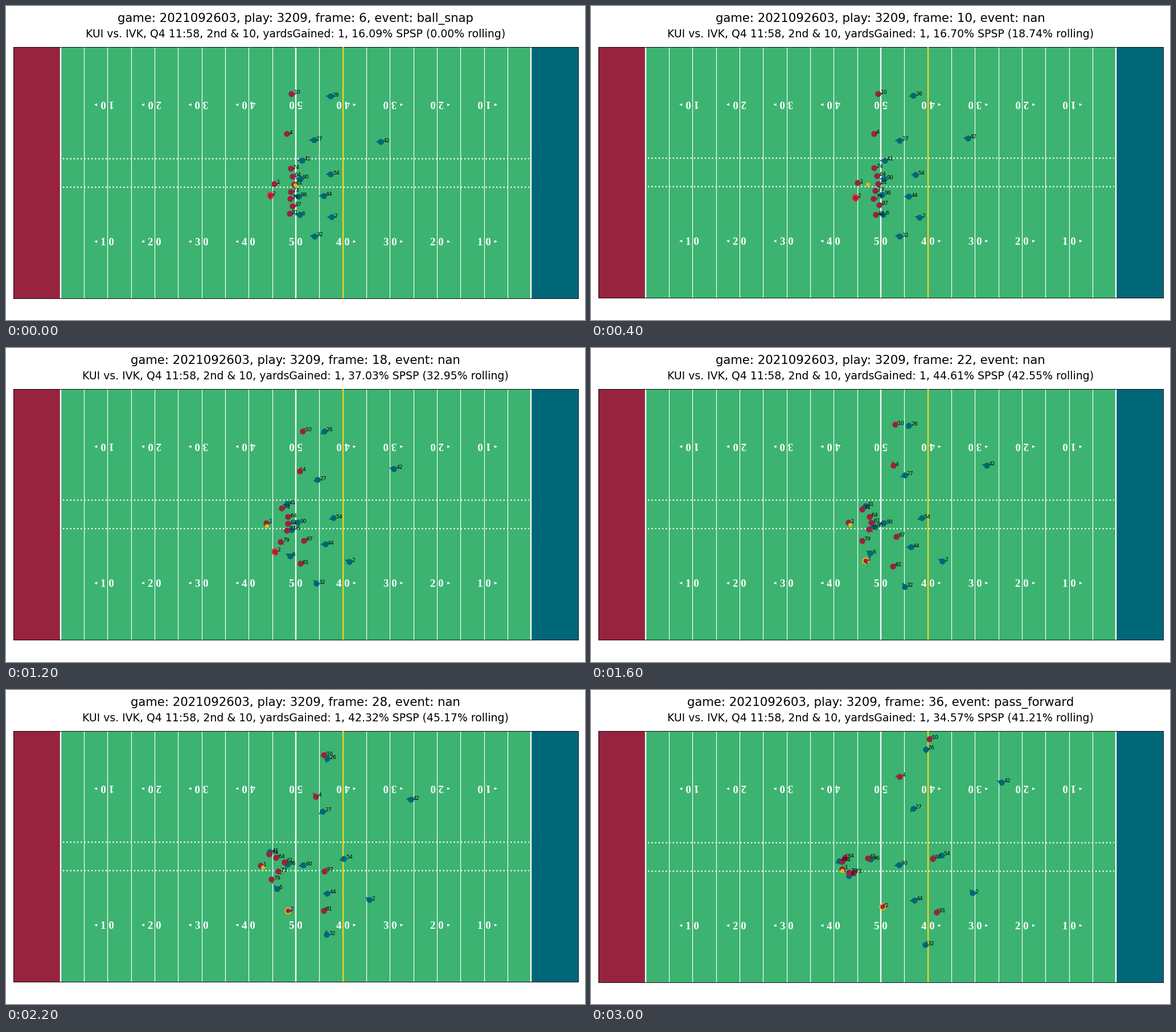
A matplotlib script for the animation above (3.1 s loop, 1017 by 551 pixels).

```python
import numpy as np
import matplotlib.pyplot as plt
from matplotlib.animation import FuncAnimation
from matplotlib.collections import PolyCollection
from matplotlib.patches import Polygon, Rectangle

W, H, DPI = 1017, 551, 84.75
FRAMES, STEP = 31, 100
LEFT, RIGHT, TOP, BOTTOM = 12.9, 1005.1, 72.5, 512.5
YARD = (RIGHT - LEFT) / 120
HOME, AWAY = "#97233F", "#006778"
T = np.arange(FRAMES)

plt.rcParams["font.family"] = "DejaVu Sans"
fig = plt.figure(figsize=((W + 1e-6) / DPI, (H + 1e-6) / DPI), dpi=DPI, facecolor="white")
ax = fig.add_axes([0, 0, 1, 1], facecolor="#3CB371")


def place_field(bottom):
    ax.set_position([LEFT / W, 1 - bottom / H, (RIGHT - LEFT) / W, (bottom - TOP) / H])


def px(yard):
    return LEFT + yard * YARD


def py(yard):
    return BOTTOM - yard * (BOTTOM - TOP) / 53.3


def glide(points, from_rest=True):
    """Cubic path through evenly timed points, one row per frame."""
    p = np.array(points, float) - (0.4, 0)
    h = (FRAMES - 1) / (len(p) - 1)
    m = np.gradient(p, axis=0, edge_order=2)
    if from_rest:
        m[0] = 0
    k = np.minimum(T // h, len(p) - 2).astype(int)
    s = (T / h - k)[:, None]
    return ((2 * s**3 - 3 * s**2 + 1) * p[k] + (s**3 - 2 * s**2 + s) * m[k]
            + (3 * s**2 - 2 * s**3) * p[k + 1] + (s**3 - s**2) * m[k + 1])


class Player:
    """Turns steadily from start to end degrees, or faces where it runs."""

    def __init__(self, number, start, end, *points):
        self.path = glide(points)
        if end is None:
            dx, dy = np.gradient(self.path, axis=0).T
            self.turn = np.arctan2(-dy, dx)
        else:
            self.turn = np.radians(np.linspace(start, end, FRAMES))
        self.label = ax.text(0, 0, str(number), fontsize=8, zorder=9)

    def pointer(self, i):
        ahead = np.array([np.cos(self.turn[i]), -np.sin(self.turn[i])])
        side = 3.2 * ahead[::-1] * (1, -1)
        return self.path[i] + [8.7 * ahead, 1.5 * ahead + side, 1.5 * ahead - side]


def home(number, end, *points):
    return Player(number, 0, end, *points)


def away(number, end, *points):
    return Player(number, 180, end, *points)


def draw_field():
    for yard, color in ((0, HOME), (110, AWAY)):
        ax.add_patch(Rectangle((px(yard), TOP), 10 * YARD, BOTTOM - TOP, color=color, lw=0))
    for yard in range(10, 111, 5):
        ax.axvline(px(yard), color="white", lw=2 if yard in (10, 60, 110) else 1, zorder=2)
    for yard in (23.65, 29.7):
        ax.plot([px(10.5), px(109.6)], [py(yard)] * 2, ":", color="white", lw=2, zorder=2)
    ax.axvline(px(70), color="#F0D020", lw=2, zorder=3)
    for yard in range(20, 101, 10):
        x, side = px(yard), np.sign(yard - 60)
        text = " ".join(str(50 - abs(yard - 60)))
        for y, angle, mid in ((11.85, 0, 412.5), (41.45, 180, 173)):
            ax.text(x, py(y), text, rotation=angle, ha="center", va="center", color="white",
                    family="Liberation Serif", weight="bold", fontsize=16, zorder=4)
            if side:
                ax.add_patch(Polygon([(x + side * 23.3, mid), (x + side * 18, mid - 2.4),
                                      (x + side * 18, mid + 2.4)], color="white", lw=0, zorder=4))


ax.set(xlim=(LEFT, RIGHT), ylim=(BOTTOM, TOP), xticks=[], yticks=[])
ax.set_autoscale_on(False)
draw_field()

offense = [
    home(10, None, (501.5, 153.5), (516, 150), (550, 121), (594.5, 85.5)),
    home(4, 175, (493.5, 224), (511, 219.5), (542, 194), (542.5, 151.6)),
    home(74, 60, (500, 284.7), (478, 282), (441, 300.5)),
    home(64, 60, (503, 298.4), (491, 295.7), (446.5, 293)),
    home(61, 0, (506, 312.5), (493, 306.5), (486, 294.5)),
    home(73, -60, (500, 325), (490, 318.5), (461, 319.7)),
    home(79, -100, (499, 337), (477.5, 338.7), (453, 319.5)),
    home(87, 70, (503.7, 350.4), (533, 332.5), (600, 295.5)),
    home(81, 60, (498, 363.6), (527, 382), (607.5, 389)),
    home(1, -40, (471, 311), (453.3, 306.3), (441.5, 313.5)),
]
star = home(2, None, (464, 331.5), (469.5, 350.5), (491.5, 384.5), (512.5, 379.7))
defense = [
    away(26, 280, (570, 158), (560, 150), (561.5, 125), (588, 104)),
    away(27, 230, (541, 235), (546.5, 234), (554.5, 215.5), (566, 207.5)),
    away(42, 165, (658.5, 238), (676, 215), (707, 198), (721.5, 161.5)),
    away(41, 220, (520, 270.6), (485, 275.8), (436, 299)),
    away(54, 215, (570.5, 294.7), (579.5, 298.5), (616, 289.5)),
    away(90, 190, (517, 302.5), (513.5, 307), (541, 306.5)),
    away(96, 180, (514, 333), (498.3, 314.5), (491.5, 296.8)),
    away(44, 190, (558, 332.5), (562, 348), (568, 368)),
    away(2, 130, (572.5, 369.5), (614, 374.3), (670.5, 355.5)),
    away(6, 110, (516, 365.5), (492.5, 361.8), (453, 325.5)),
    away(32, 60, (542, 403), (549.5, 417.5), (587.5, 446.3)),
]
ball_path = glide([(508.5, 313), (463, 312.5), (453.3, 310), (441, 316.5)], from_rest=False)


def dots(color, size, z):
    return ax.plot([], [], "o", color=color, ms=size * 72 / DPI, mew=0, zorder=z)[0]


teams = []
for squad, color, z in ((defense, AWAY, 5), (offense, HOME, 6), ([star], HOME, 7)):
    wedges = PolyCollection([], facecolor=color, edgecolor="none", zorder=z + 0.5)
    ax.add_collection(wedges, autolim=False)
    teams.append((squad, dots(color, 10.4, z), wedges))
ring = teams[-1][1]
ring.set(markeredgewidth=2, markersize=8.6)
ball = dots("#ECB90C", 7, 8)

head = fig.text(0.5, 1 - 28 / H, "", ha="center", va="baseline", fontsize=18)
sub = fig.text(0.5, 1 - 55 / H, "", ha="center", va="baseline", fontsize=16)

marks_at = [0, 4, 12, 16, 22, 26, 30]
score = np.interp(T, marks_at, [16.09, 16.70, 37.03, 44.61, 42.32, 50.40, 34.57])
rolling = np.interp(T, marks_at[1:], [18.74, 32.95, 42.55, 45.17, 57.36, 41.21])
rolling[:4] = 0  # the five-step window is not full yet
events = {0: "ball_snap", FRAMES - 1: "pass_forward"}


def update(i):
    place_field(BOTTOM + (i in events))
    head.set_text(f"game: 2021092603, play: 3209, frame: {i + 6}, event: {events.get(i, 'nan')}")
    sub.set_text("KUI vs. IVK, Q4 11:58, 2nd & 10, yardsGained: 1, "
                 f"{score[i]:.2f}% SPSP ({rolling[i]:.2f}% rolling)")
    for squad, spots, wedges in teams:
        spots.set_data(*np.array([p.path[i] for p in squad]).T)
        wedges.set_verts([p.pointer(i) for p in squad])
        for p in squad:
            p.label.set_position(p.path[i] + (4.1, 0.4))
    ring.set_markeredgecolor("#F5A623" if rolling[i] > 35 else "#FA2D2D")
    ball.set_data(*ball_path[i][:, None])


anim = FuncAnimation(fig, update, frames=FRAMES, interval=STEP, init_func=lambda: update(0),
                     repeat=True, repeat_delay=0, blit=False)
plt.show()
```
